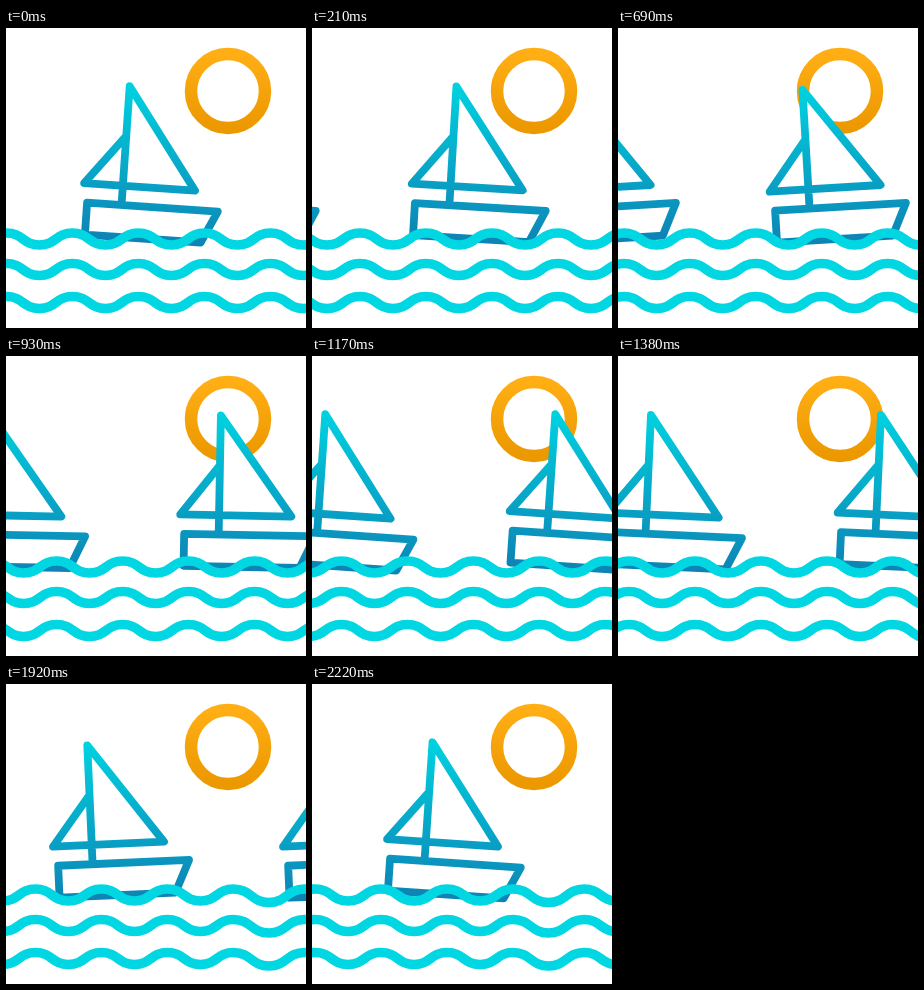
Recreate the animation shown at these times as an HTML page. Size 300 by 300 pixels, loop 2.25 s.

```html
<!DOCTYPE html>
<html lang="en">
<head>
<meta charset="utf-8">
<title>Sailing boats</title>
<style>
  html, body { margin: 0; width: 100%; height: 100%; overflow: hidden; background: #fff; }
  svg { display: block; width: 100%; height: 100%; }
</style>
</head>
<body>
<svg viewBox="0 0 300 300" fill="none" stroke-linecap="round" stroke-linejoin="round">
  <defs>
    <linearGradient id="sunTone" x2="0" y2="1">
      <stop stop-color="#ffae14"/>
      <stop offset="1" stop-color="#ec9800"/>
    </linearGradient>
    <linearGradient id="boatTone" gradientUnits="userSpaceOnUse" x1="0" y1="-79" x2="0" y2="79">
      <stop stop-color="#00d2e0"/>
      <stop offset="1" stop-color="#0d83b4"/>
    </linearGradient>
    <!-- Boat drawn around its rocking centre -->
    <path id="boat" fill="#fff" stroke="url(#boatTone)" stroke-width="7.8"
      d="M-62.5 43H68.5L53.5 75H-62.5Z M-28 42V-76L44.3 23.7H-66.8L-29-25"/>
  </defs>
  <circle cx="222" cy="63" r="37" stroke="url(#sunTone)" stroke-width="12.5"/>
  <g id="boats"></g>
  <g id="waves" stroke="#00d7e2" stroke-width="9.6"></g>
</svg>
<script>
  const LOOP = 2250, BOAT_GAP = 230, WAVE_LENGTH = 66;
  const boats = document.getElementById('boats');
  const waves = document.getElementById('waves');

  boats.innerHTML = '<use href="#boat"/>'.repeat(3);

  // One swell from crest to crest
  function swell(length, depth) {
    const half = length / 2, handle = length / 4;
    return `c${handle} 0 ${half - handle} ${depth} ${half} ${depth}` +
           `s${half - handle} ${-depth} ${half} ${-depth}`;
  }
  // A wider, deeper swell joins the two stretches of water
  const water = swell(WAVE_LENGTH, 12).repeat(7) + swell(71, 13.5) + swell(WAVE_LENGTH, 12).repeat(2);
  waves.innerHTML = [205, 235.5, 268.5]
    .map(y => `<path d="M${-WAVE_LENGTH} ${y}${water}"/>`).join('');

  // Rocks twice per loop, lingering near each end of the swing
  function rockAngle(t) {
    const c = Math.cos((t - 60 / LOOP) * 4 * Math.PI);
    return 0.25 + 3.7 * c * (1.5 - 0.5 * c * c);
  }

  function draw(now) {
    const t = now % LOOP / LOOP;
    const angle = rockAngle(t);
    [...boats.children].forEach((boat, i) => {
      const x = 146.3 + BOAT_GAP * (t + i - 1);
      boat.setAttribute('transform', `translate(${x} 136) rotate(${angle})`);
    });
    waves.setAttribute('transform', `translate(${0.5 - 3 * WAVE_LENGTH * t})`);
  }

  const start = performance.now();
  function tick() {
    draw(performance.now() - start);
    requestAnimationFrame(tick);
  }
  tick();
</script>
</body>
</html>
```
